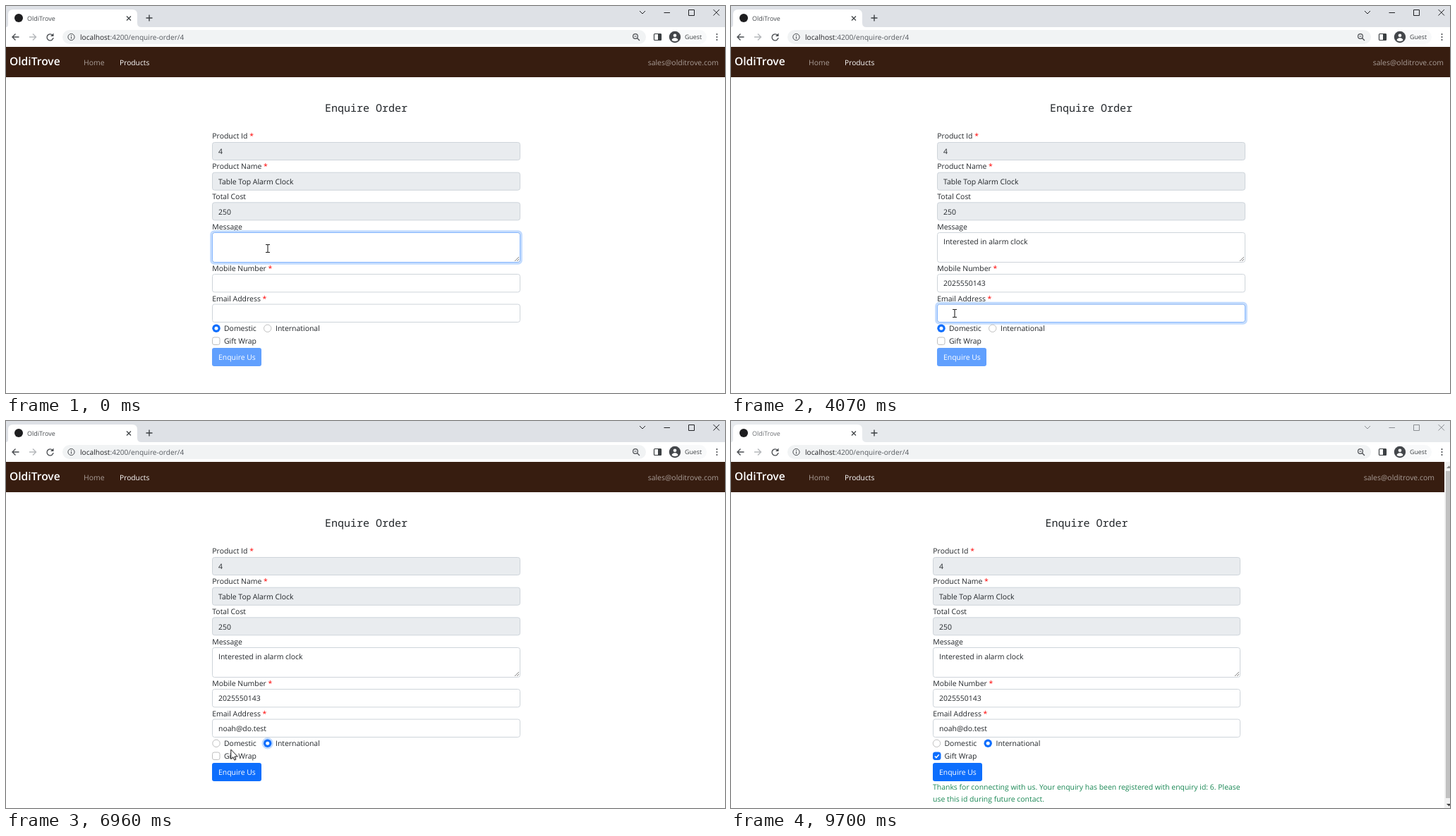
These frames come from a looping animation (1019 px wide and 549 px high, 9.77 s). An HTML page:

```html
<!DOCTYPE html>
<html lang="en">
<head>
<meta charset="utf-8">
<title>OldiTrove</title>
<style>
  html, body { margin: 0; width: 100%; height: 100%; overflow: hidden; background: #fff; }
  svg { display: block; width: 1019px; height: 549px; }
  text { font-family: 'Open Sans', 'Noto Sans', sans-serif; text-rendering: geometricPrecision; }
  .mono { font-family: 'Noto Sans Mono', monospace; }
</style>
</head>
<body>
<svg id="stage" viewBox="0 0 1019 549"></svg>
<script>
const LOOP = 9770, SIZE = 10.45;
const INK = '#212529', BLUE = '#0d6efd';
const MESSAGE = 'Interested in alarm clock', MOBILE = '2025550143', EMAIL = 'noah@do.test';

// [time, typed characters]
const messageKeys = [[220, 0], [1070, 10], [1220, 11], [1370, 12], [1880, 23], [2030, 24], [2110, 25]];
const mobileKeys = [[2770, 0], [2850, 1], [2920, 2], [3000, 3], [3560, 10]];
const emailKeys = [[4320, 0], [4400, 1], [4480, 2], [4620, 3], [4700, 4], [4880, 5], [5290, 6],
  [5590, 7], [5660, 8], [5770, 9], [5920, 10], [6030, 12]];
// [time, x, y]
const pointerKeys = [[2180, 371, 344], [2330, 341, 393], [3580, 341, 393], [3810, 317, 436],
  [6200, 317, 436], [6480, 371, 456], [6640, 371, 456], [6960, 319, 466], [7070, 298, 473],
  [7200, 299, 473], [7330, 325, 494], [7800, 325, 494], [8070, 4, 503]];

const pen = document.createElement('canvas').getContext('2d');
pen.font = `${SIZE}px 'Open Sans', 'Noto Sans', sans-serif`;
const clamp = v => Math.max(0, Math.min(1, v));
const between = (t, a, b) => t >= a && t < b;

function lerpKeys(keys, t, col = 1) {
  if (t <= keys[0][0]) return keys[0][col];
  const i = keys.findIndex(k => k[0] > t);
  if (i < 0) return keys[keys.length - 1][col];
  const a = keys[i - 1], b = keys[i];
  return a[col] + (b[col] - a[col]) * (t - a[0]) / (b[0] - a[0]);
}
const typed = (s, keys, t) => s.slice(0, Math.floor(lerpKeys(keys, t) + 1e-6));

const text = (x, y, s, fill = INK, size = SIZE, more = '') =>
  `<text x="${x}" y="${y}" fill="${fill}" font-size="${size}" ${more}>${s}</text>`;
const rect = (x, y, w, h, fill, r = 0, more = '') =>
  `<rect x="${x}" y="${y}" width="${w}" height="${h}" rx="${r}" fill="${fill}" ${more}/>`;
const circle = (x, y, r, fill, more = '') =>
  `<circle cx="${x}" cy="${y}" r="${r}" fill="${fill}" ${more}/>`;
const line = (d, stroke, w = 1, more = '') =>
  `<path d="${d}" fill="none" stroke="${stroke}" stroke-width="${w}" ${more}/>`;

function chrome(t) {
  const blurred = t >= 9660;
  const control = blurred ? '#8b8e92' : '#202124', icon = '#4a4d51';
  return rect(0, 0, 1019, 31, blurred ? '#e7eaed' : '#dee1e6') +
    rect(0, 30, 1019, 28, '#fff') +
    '<path d="M0 30Q3 30 3 26V12Q3 5 10 5H179Q186 5 186 12V24Q186 30 192 30Z" fill="#fff"/>' +
    circle(18, 17, 6, '#1d1d1f') +
    text(30, 20.5, 'OldiTrove', blurred ? '#6a6d71' : '#45494d', 8.96) +
    line('M171 14.500l6 6m0-6l-6 6', '#3c4043', 1.2) +
    line('M203 12.500v9m-4.500-4.500h9', '#3c4043', 1.4) +
    line('M898 7l4 4 4-4M932.500 9.500h8.500M967.500 5.500h8v8h-8zM1002.500 5l8.500 8.500m0-8.500l-8.500 8.500', control) +
    line('M18.500 44H9m4.500-4.500L9 44l4.500 4.500', icon, 1.4) +
    line('M33 44h9.500m-4.500-4.500l4.500 4.500-4.500 4.500', '#b5b8bb', 1.4) +
    line('M66 41.500A4.500 4.500 0 1 0 67 45', icon, 1.4) +
    `<path d="M67.500 38.500v4.500H63z" fill="${icon}"/>` +
    rect(80, 34, 827, 20, '#f1f3f4', 10) +
    circle(92.5, 44, 4.6, 'none', `stroke="${icon}"`) +
    line('M92.500 43.500v3M92.500 41.300v1.200', icon, 1.1) +
    text(105, 48, '<tspan fill="#202124">localhost</tspan>:4200/enquire-order/4', '#54585d', 10.15) +
    circle(892, 43, 3.4, 'none', `stroke="${icon}" stroke-width="1.2"`) +
    line('M894.500 45.500l3.500 3.500M890.500 43h3', icon, 1.2) +
    rect(918.5, 39.5, 10, 9, 'none', 1, 'stroke="#3c4043" stroke-width="1.2"') +
    rect(924, 39.5, 4.5, 9, '#3c4043') +
    rect(938, 34, 55, 20, '#f8f9fa', 10) +
    circle(948, 44, 8.2, '#43464a') + circle(948, 41.8, 2.3, '#fff') +
    '<path d="M943.500 48.800Q944 45.300 948 45.300T952.500 48.800Q948 51.500 943.500 48.800Z" fill="#fff"/>' +
    text(962, 47.3, 'Guest', '#3c4043', 8.8) +
    [40, 44, 48].map(y => circle(1007.5, y, 1.1, icon)).join('');
}

function page(t) {
  const done = t >= 7440;
  const X = done ? 286 : 292, W = done ? 436 : 437, shift = done ? -6.5 : 0;
  // focus strength of a control that is active from a to b
  const focus = (a, b) => clamp((t - a) / 60) - clamp((t - b) / 60);

  const label = (y, s, star) =>
    text(X + .3, y, s + (star ? ' <tspan fill="#f00">*</tspan>' : ''));

  function field(y, h, s, fill = '#fff', ring = 0, caret = false) {
    let out = rect(X + .5, y + .5, W - 1, h - 1, fill, 3, 'stroke="#ced4da"');
    if (ring > 0) out += `<g opacity="${ring.toFixed(2)}">` +
      rect(X - 1.4, y - 1.4, W + 2.8, h + 2.8, 'none', 4.5, 'stroke="#c2dbfe" stroke-width="2.8"') +
      rect(X + .5, y + .5, W - 1, h - 1, 'none', 3, 'stroke="#86b7fe"') + '</g>';
    out += text(X + 9, y + 17.2, s);
    if (caret) out += rect(Math.round(X + 8.6 + pen.measureText(s).width), y + 5.5, 1, 15, '#000');
    return out;
  }

  function radio(x, on, ring = 0) {
    const y = 457.3;
    return (ring > 0 ? circle(x, y, 6.8, 'none', `stroke="#c2dbfe" stroke-width="2.8" opacity="${ring.toFixed(2)}"`) : '') +
      (on ? circle(x, y, 5.7, BLUE) + circle(x, y, 2.5, '#fff')
          : circle(x, y, 5.2, '#fff', 'stroke="#bfbfbf"'));
  }

  const intl = t >= 6560, gift = t >= 7130;
  const giftRing = focus(7130, 7370), btnRing = focus(7370, 9640);
  const ready = between(t, 5290, 5770) || t >= 5920;
  const hover = between(t, 7250, 9660), pressed = between(t, 7400, 7510);
  const btnFill = pressed ? '#0a58ca' : hover ? '#0b5ed7' : between(t, 9660, 9700) ? '#0c66ea' : BLUE;
  const check = X + .5;

  let out = rect(0, 58, 1019, 491, '#fff') +
    rect(0, 58, done ? 1011 : 1019, 43, '#371d10') +
    text(5, 84, 'OldiTrove', '#fff', 15.6, 'font-weight="600"') +
    text(110, 84, 'Home', '#a99d97') +
    text(161, 84, 'Products', '#fff', 10.25) +
    text(done ? 997 : 1010, 84, 'sales@olditrove.com', '#a99d97', SIZE, 'text-anchor="end"') +
    text(452 + shift, 150, 'Enquire Order', INK, 15, 'class="mono"') +
    label(188.3, 'Product Id', 1) + field(193, 26, '4', '#e9ecef') +
    label(231, 'Product Name', 1) + field(235.7, 26, 'Table Top Alarm Clock', '#e9ecef') +
    label(273.7, 'Total Cost') + field(278.3, 26, '250', '#e9ecef') +
    label(316.5, 'Message') +
    field(321, 43, typed(MESSAGE, messageKeys, t), '#fff', focus(-100, 2480), between(t, 220, 2480)) +
    line(`M${X + W - 8} 362l6-6m-3 6l3-3`, '#777', .9) +
    label(375.7, 'Mobile Number', 1) +
    field(380, 26.4, typed(MOBILE, mobileKeys, t), '#fff', focus(2460, 3880), between(t, 2660, 3880)) +
    label(418.5, 'Email Address', 1) +
    field(422.6, 26.4, typed(EMAIL, emailKeys, t), '#fff', focus(3880, 6560),
      between(t, 4250, 6560) && !between(t, 5110, 5290) && !between(t, 5440, 5590));

  if (between(t, 2330, 4000))
    out += rect(709, 387, 11, 13, '#efefef') +
      '<path d="M712 391.500l2.500-3 2.500 3zM712 395.500l2.500 3 2.500-3z" fill="#444"/>';

  out += radio(298 + shift, !intl) + text(309 + shift, 461.3, 'Domestic') +
    radio(370.7 + shift, intl, focus(6560, 7130)) + text(382 + shift, 461.3, 'International');

  if (giftRing > 0)
    out += rect(check - 1.4, 468.6, 13.8, 13.8, 'none', 4, `stroke="#c2dbfe" stroke-width="2.8" opacity="${giftRing.toFixed(2)}"`);
  out += rect(check, 470, 10.5, 10.5, gift ? BLUE : '#fff', 2.5, `stroke="${gift ? BLUE : '#bfbfbf'}"`) +
    (gift ? line(`M${check + 2.4} 475.500l2 2.100 3.800-4.300`, '#fff', 1.5) : '') +
    text(309 + shift, 479.2, 'Gift Wrap');

  if (btnRing > 0)
    out += rect(X - 1.4, 483.6, 72.8, 28.8, 'none', 4.5, `stroke="#98c1fe" stroke-width="2.8" opacity="${btnRing.toFixed(2)}"`);
  out += rect(X, 485, 70, 26, btnFill, 3, ready ? '' : 'opacity=".65"') +
    text(X + 9, 502, 'Enquire Us', '#fff');

  if (done)
    out += text(X, 523, 'Thanks for connecting with us. Your enquiry has been registered with enquiry id: 6. Please', '#198754') +
      text(X, 540, 'use this id during future contact.', '#198754') +
      rect(1011, 58, 8, 491, '#f1f1f1') + rect(1013, 71, 6, 464, '#c1c1c1') +
      '<path d="M1014 67l3.500-3.500 3.500 3.500z" fill="#8a8a8a"/>' +
      '<path d="M1014 543l3.500 3.500 3.500-3.500z" fill="#444"/>';
  return out;
}

function pointer(t) {
  if (t >= 8070) return '';
  const x = lerpKeys(pointerKeys, t, 1), y = lerpKeys(pointerKeys, t, 2);
  const inField = x > 292 && (between(y, 321, 364) || between(y, 380, 406) || between(y, 422, 449));
  const onButton = between(x, 286, 362) && between(y, 485, 511);
  const solid = d => `<path d="${d}" fill="#fff" stroke="#000" stroke-width=".9" stroke-linejoin="round"/>`;
  const shape = inField
    ? line('M-3-5.500h2.200q.8 0 .8.800v9.400q0 .8-.8.800H-3M3-5.500H.8q-.8 0-.8.800M0 4.700q0 .8.800.800H3', '#222', 1.1)
    : onButton
      ? solid('M-1.500.8Q0-1 1.500.8V5Q3 4 4.200 5.300 6 4.800 6.800 6.500 8.600 6.500 8.600 8.500V11Q8.600 13 7 15.500H0Q-2 12.500-5 9-4.600 7-2.800 8L-1.500 9Z')
      : solid('M0 0V13.500L3.100 10.600 5 15 7 14.200 5.200 9.900H9.500Z');
  return `<g transform="translate(${x.toFixed(1)} ${y.toFixed(1)})">${shape}</g>`;
}

const stage = document.getElementById('stage');
const begin = performance.now();
let shown = '';
function frame() {
  const t = (performance.now() - begin) % LOOP;
  const view = page(t) + chrome(t) + pointer(t);
  if (view !== shown) stage.innerHTML = shown = view;
  requestAnimationFrame(frame);
}
frame();
</script>
</body>
</html>
```
